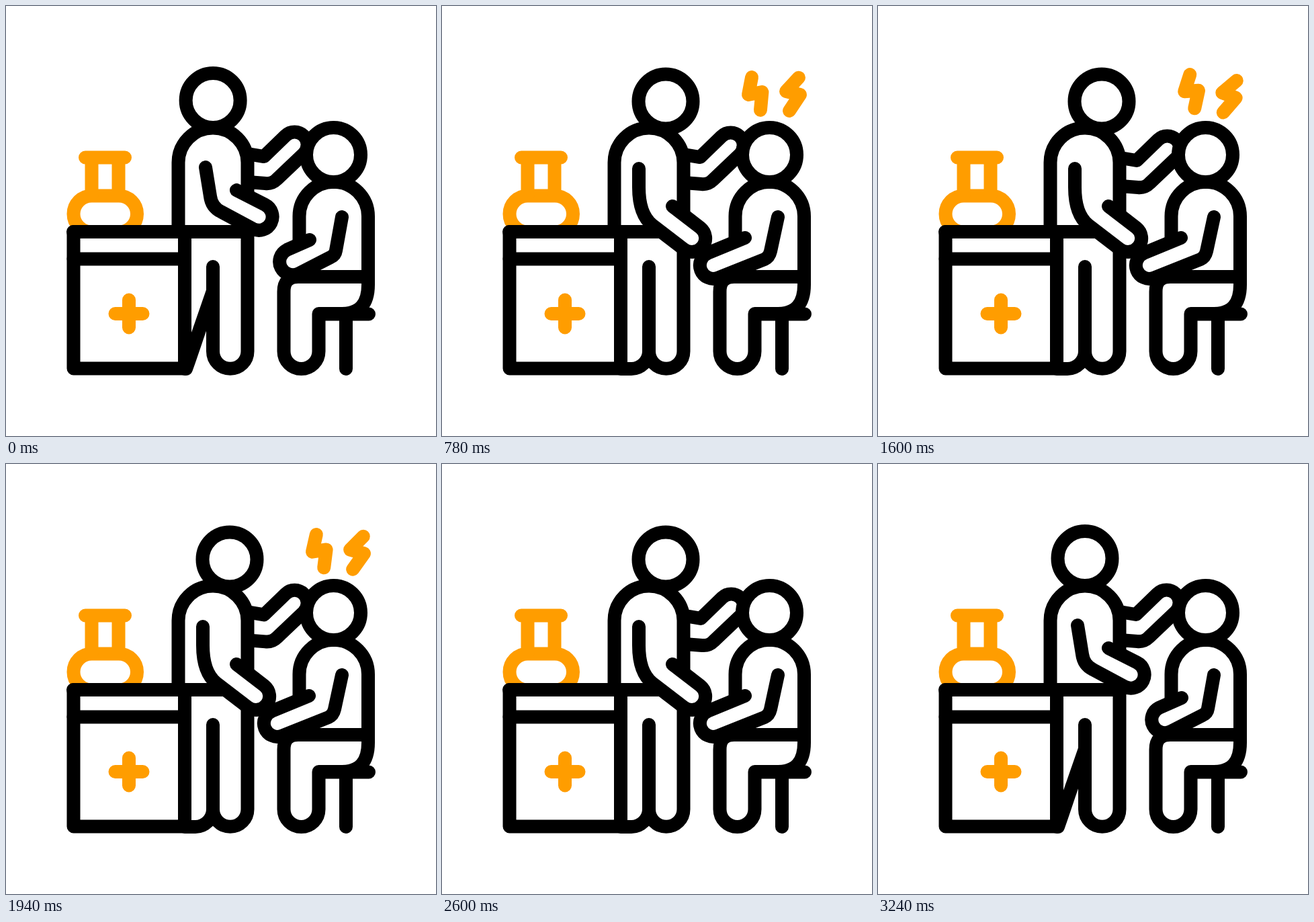
Animation, 640 px wide and 640 px high, one loop 3600 ms. Source, as an HTML page:

```html
<!DOCTYPE html>
<html lang="en">
<head>
<meta charset="utf-8">
<title>Head check-up</title>
<style>
  html, body { margin: 0; width: 100%; height: 100%; overflow: hidden; background: #fff; }
  svg { display: block; width: 100vw; height: 100vh; }
  .ink { fill: #fff; stroke: #000; stroke-width: 20; stroke-linecap: round; stroke-linejoin: round; }
  .amber { stroke: #ff9d00; }
  .line { fill: none; }
</style>
</head>
<body>
<svg viewBox="0 0 640 640" class="ink">
  <g class="amber">
    <rect x="100.5" y="282.5" width="94.5" height="54" rx="27"/>
    <path class="line" d="M118 225.5H177M127.5 225.5V282M167.5 225.5V282"/>
  </g>

  <!-- doctor -->
  <path id="rearArm" d="M360 220L384 224L416 193A19 19 0 0 1 443 220L403 258Q396 265 386 264L360 262"/>
  <path class="line" id="rearLeg"/>
  <path d="M256.5 336V233A51.5 51.5 0 0 1 359.5 233V336"/>
  <path class="line" d="M359.5 336V514A25.75 25.75 0 0 1 308 514V388M100 336H359.5"/>
  <circle id="head" r="40.5"/>
  <path id="frontArm"/>

  <!-- desk -->
  <rect x="100.5" y="336" width="165.5" height="203.5"/>
  <path class="line" d="M100.5 376.5H266"/>
  <path class="line amber" d="M162.5 458H203.5M183 437.5V478.5"/>

  <!-- patient -->
  <path class="line" d="M466 458.5H540M506 458V540"/>
  <path d="M436.5 370V313A51.25 51.25 0 0 1 539 313V403"/>
  <path d="M539 403H435Q413.5 403 413.5 425V514A26 26 0 0 0 465.5 514V458H500Q539 458 539 415Z"/>
  <circle cx="487.5" cy="221.5" r="40.5"/>
  <path id="lapArm"/>

  <g id="bolts" class="amber line">
    <path id="boltL" d="M461 106L456 132L476.5 128L474 155"/>
    <path id="boltR" d="M531 106.5L512 127L533 132L517 156"/>
  </g>
</svg>
<script>
const $ = id => document.getElementById(id);
const STEP = 540, LOOP = 3600;

// Key values at each multiple of STEP
const keys = {
  pose:  [0, 1, 1, 1, 1, 1, 0],
  rub:   [0, 1, 0, 1, 0, 1, 0],
  pain:  [0, 0, 1, 1, 1, 0, 0],
  angle: [0, 0, 0, 7, 1.5, 1.5, 0]
};

// Each limb: path at rest and path when reaching.
// Hand radii are below half the chord, so they grow to a half circle.
const limbs = {
  rearLeg: [
    "M308 424L284 493C279 508 274 523 268 540L266 540",
    "M308 424L308 514C308 528 296 540 282 540L266 540"],
  frontArm: [
    "M297 240L304 283Q306 299 320 306L367.5 331.5A19 19 0 0 0 385.5 295.5L343 274",
    "M293 242L293 270Q293 310 313 326L359.5 361.6A19 19 0 0 0 384.5 330L343 298"],
  lapArm: [
    "M500 314L491 364Q490 371 483 374L436 398A19 19 0 0 1 418 363L452 348",
    "M500 314L489 365Q487 374 480 377L411 404.5A19 19 0 0 1 396.5 367.5L451 345"]
};

const mix = (a, b, k) => a + (b - a) * k;
const easeOut = x => 1 - (1 - x) ** 3;

function mixPath([from, to], k) {
  const ends = to.match(/[\d.]+/g);
  let i = 0;
  return from.replace(/[\d.]+/g, n => mix(+n, +ends[i++], k));
}

const set = (id, name, value) => $(id).setAttribute(name, value);
const scaleAt = (x, y, s) => `translate(${x} ${y}) scale(${s}) translate(${-x} ${-y})`;

function draw(time) {
  const at = Math.min(time % LOOP / STEP, 6);
  const i = Math.min(Math.floor(at), 5);
  const k = easeOut(at - i);
  const value = (name, p = k) => mix(keys[name][i], keys[name][i + 1], p);

  const pose = value("pose");
  for (const id in limbs) set(id, "d", mixPath(limbs[id], pose));
  set("head", "cx", mix(308, 333, pose));
  set("head", "cy", mix(140.5, 142, pose));

  const rub = value("rub");
  set("rearArm", "transform", `translate(${rub} ${6 * rub})`);

  const size = value("pain", Math.min(1, 1.2 * k));
  set("bolts", "visibility", size > 0.01 ? "visible" : "hidden");
  set("bolts", "transform", `rotate(${value("angle")} 495 131)`);
  set("boltL", "transform", scaleAt(467, 131, size));
  set("boltR", "transform", scaleAt(524, 131, size));
}

const start = performance.now();
function tick() {
  draw(performance.now() - start);
  requestAnimationFrame(tick);
}
tick();
</script>
</body>
</html>
```
